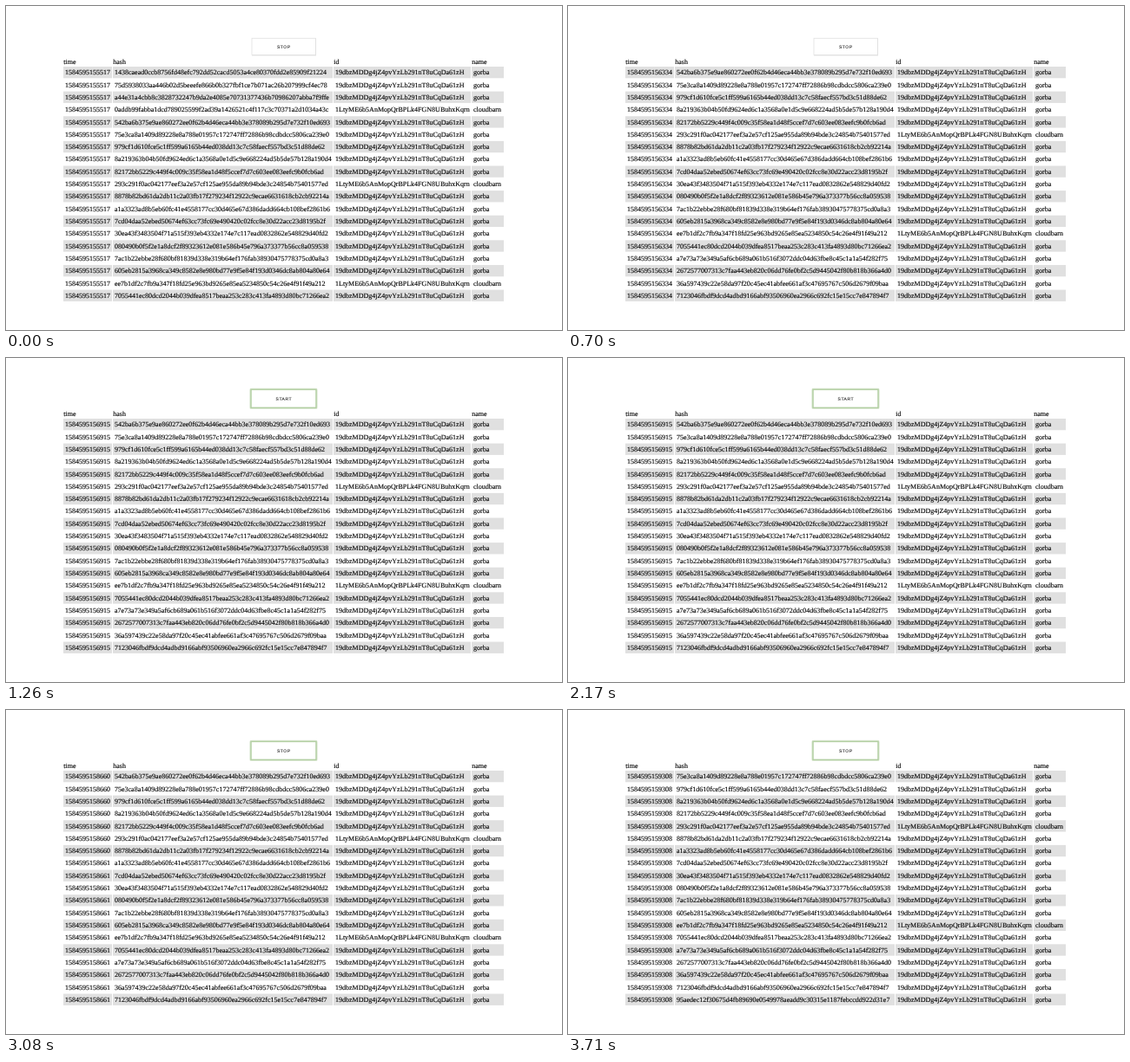
These frames come from a looping animation (640x374 px, 4.62 s). An HTML page:

```html
<!DOCTYPE html>
<html lang="en">
<head>
<meta charset="utf-8">
<title>Transaction feed</title>
<style>
html, body { margin: 0; width: 100%; height: 100%; overflow: hidden; background: #fff; }
svg { display: block; width: 640px; height: 374px; }
text { text-rendering: geometricPrecision; white-space: pre; }
.table { font: 8px "Liberation Serif", "Times New Roman", serif; fill: #000; stroke: #000; stroke-width: .12px; }
.label { font: 5px "Liberation Sans", Arial, sans-serif; letter-spacing: .5px; fill: #222; stroke: #222; stroke-width: .1px; text-anchor: middle; }
</style>
</head>
<body>
<svg id="stage" viewBox="0 0 640 374"></svg>
<script>
const LOOP = 4620, ROWS = 19, PITCH = 14.31;
const hashes = `
1438caead0ccb8756fd48efc792dd52cacd5053a4ce80370fdd2e85909f21224
75d5938033aa446b02d5beeefe866b0b327fbf1ce7b071ac26b207999cf4ec78
a44e31a4cbb8c3828732247b9da2e4085e70731377436b70986207abba7f9ffe
0addb99fabba1dcd789025599f2ad39a1426521c4f117c3c70371a2d1034a43c
542ba6b375e9ae860272ee0f62b4d46eca44bb3e378089b295d7e732f10ed693
75e3ca8a1409d89228e8a788e01957c172747ff72886b98cdbdcc5806ca239e0
979cf1d610fce5c1ff599a6165b44ed038dd13c7c58faecf557bd3c51d88de62
8a219363b04b50fd9624ed6c1a3568a0e1d5c9e668224ad5b5de57b128a190d4
82172bb5229c449f4c009c35f58ea1d48f5ccef7d7c603ee083eefc9b0fcb6ad
293c291f0ac042177eef3a2e57cf125ae955da89b94bde3c24854b75401577ed
8878b82bd61da2db11c2a03fb17f279234f12922c9ecae6631618cb2cb92214a
a1a3323ad8b5eb60fc41e4558177cc30d465e67d386dadd664cb108bef2861b6
7cd04daa52ebed50674ef63cc73fc69e490420c02fcc8e30d22acc23d8195b2f
30ea43f3483504f71a515f393eb4332e174e7c117ead0832862e548829d40fd2
080490b0f5f2e1a8dcf2f89323612e081e586b45e796a373377b56cc8a059538
7ac1b22ebbe28f680bf81839d338e319b64ef176fab38930475778375cd0a8a3
605eb2815a3968ca349c8582e8e980bd77e9f5e84f193d0346dc8ab804a80e64
ee7b1df2c7fb9a347f18fd25e963bd9265e85ea5234850c54c26e4f91f49a212
7055441ec80dcd2044b039dfea8517beaa253c283c413fa4893d80bc71266ea2
a7e73a73e349a5af6cb689a061b516f3072ddc04d63fbe8c45c1a1a54f282f75
2672577007313c7faa443eb820c06dd76fe0bf2c5d9445042f80b818b366a4d0
36a597439c22e58da97f20c45ec41abfee661af3c47695767c506d2679f09baa
7123046fbdf9dcd4adbd9166abf93506960ea2966c692fc15e15cc7e847894f7
95aedec12f30675d4fb89690e0549978aeadd9c30315e1187febccdd922d31e7`.trim().split("\n");
const weatherRows = [3, 9, 17];
const columns = [["time", 66, 122], ["hash", 123, 376], ["id", 377, 535], ["name", 536, 573]];

const states = [
  { at: 0, first: 0, time: 1584595155517, label: "STOP" },
  { at: 700, first: 4, time: 1584595156334, label: "STOP" },
  { at: 1120, first: 4, time: 1584595156334, label: "STOP", focus: true, pressed: true },
  { at: 1260, first: 4, time: 1584595156915, label: "START", focus: true },
  { at: 2870, first: 4, time: 1584595156915, label: "START", focus: true, pressed: true },
  // the clock ticks over while this list is being filled
  { at: 3080, first: 4, time: 1584595158660, tick: 7, label: "STOP", focus: true },
  { at: 3710, first: 5, time: 1584595159308, label: "STOP", focus: true }
];

const text = (x, y, s, cls = "table") => `<text class="${cls}" x="${x}" y="${y}">${s}</text>`;
const box = (x, y, w, h, style) => `<rect x="${x}" y="${y}" width="${w}" height="${h}" ${style}/>`;

function button({ label, focus, pressed }) {
  let out = "";
  if (focus) {
    out += box(281.5, 35.9, 76, 22, 'rx="1" fill="none" stroke="#dfead8" stroke-width="2.4"')
      + box(282, 36.4, 75, 21, 'fill="#fff" stroke="#b3cfa3" stroke-width="1.5"');
    if (pressed) out += box(282.8, 37.2, 73.4, 19.4, 'fill="none" stroke="#c4c8c1" stroke-width=".8"');
  } else {
    out += box(283, 37.4, 74, 20, 'fill="#ddd"')
      + box(283, 37.2, 73.4, 19.4, 'fill="#fff" stroke="#ddd" stroke-width=".7"');
  }
  return out + text(319.8, 48.8, label, "label");
}

function row(state, i) {
  const n = state.first + i, y = 70 + i * PITCH;
  const weather = weatherRows.includes(n);
  const cells = [
    state.time + (i >= state.tick ? 1 : 0),
    hashes[n],
    weather ? "1LtyME6b5AnMopQrBPLk4FGN8UBuhxKqrn" : "19dbzMDDg4jZ4pvYzLb291nT8uCqDa61zH",
    weather ? "cloudbarn" : "gorba"
  ];
  return columns.map(([, left, right], c) =>
    (i % 2 ? "" : box(left, y, right - left, 13.3, 'fill="#e0e0e0"'))
    + text(left + 2, y + 9.3, cells[c])).join("");
}

function draw(state) {
  let out = button(state) + columns.map(([name, x]) => text(x + .3, 67.2, name)).join("");
  for (let i = 0; i < ROWS; i++) out += row(state, i);
  stage.innerHTML = out;
}

const stage = document.getElementById("stage");
const start = performance.now();
let shown;
function frame() {
  const t = (performance.now() - start) % LOOP;
  const state = states.findLast(s => s.at <= t);
  if (state !== shown) draw(shown = state);
  requestAnimationFrame(frame);
}
frame();
</script>
</body>
</html>
```
